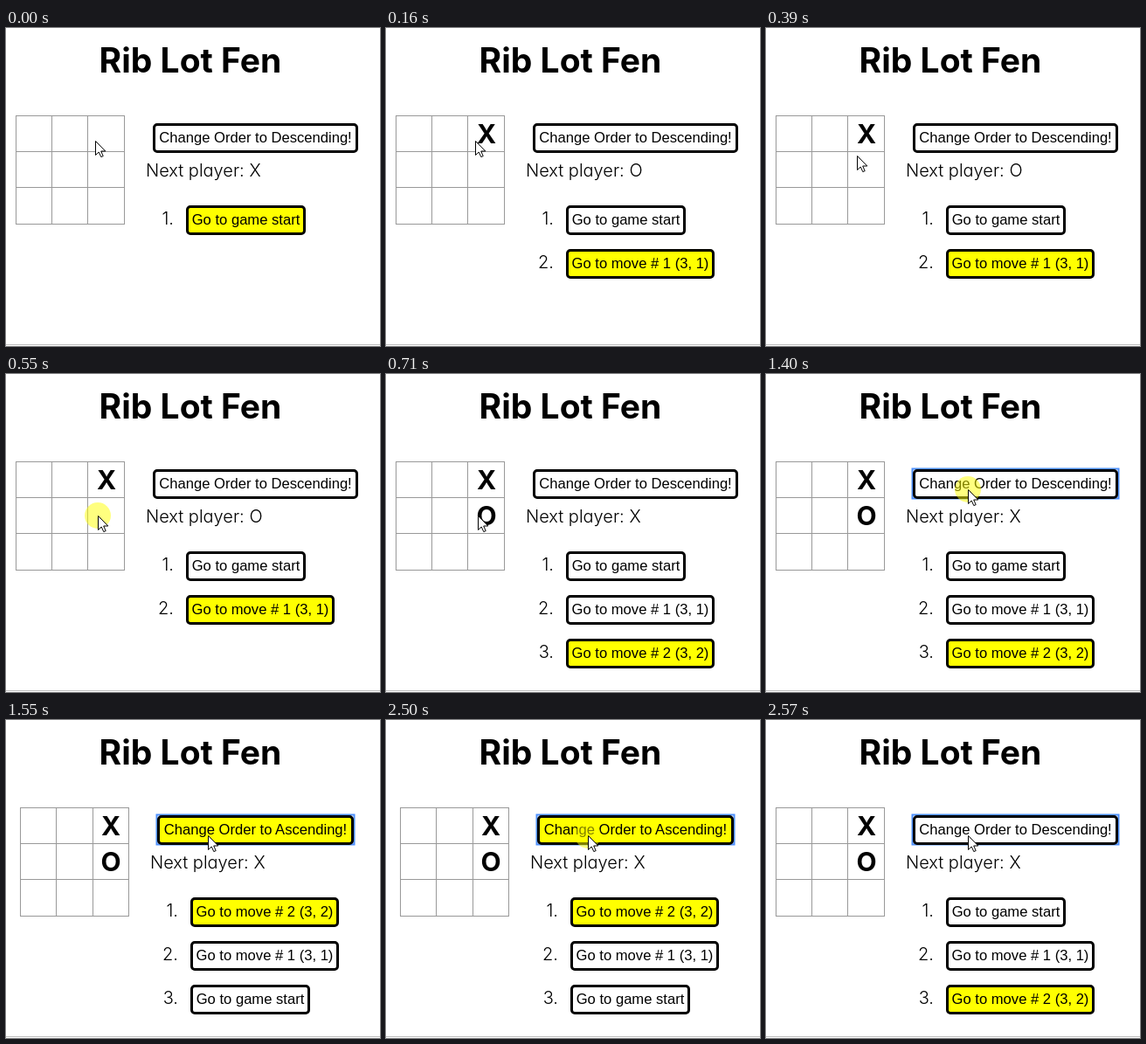
Recreate the animation shown at these times as an HTML page. Size 428 px wide and 364 px high, loop 2.73 s.

```html
<!DOCTYPE html>
<html lang="en">
<head>
<meta charset="utf-8">
<title>Three in a row</title>
<style>
  html, body { margin: 0; width: 100%; height: 100%; overflow: hidden; background: #fff; }
  svg { display: block; width: 428px; height: 364px; }
  text { font: 300 20px Inter, sans-serif; font-feature-settings: "cv11"; fill: #000; }
  .title { font-size: 39px; font-weight: 700; text-anchor: middle; }
  .mark { font-size: 30px; font-weight: 700; text-anchor: middle; }
  .num { text-anchor: end; }
  .label { font: 16.6px Arial, "Liberation Sans", sans-serif; text-anchor: middle; }
</style>
</head>
<body>
<svg viewBox="0 0 428 364">
  <text class="title" x="211" y="51">Rib Lot Fen</text>
  <rect y="362" width="428" height="1" fill="#bdbdbd"/>
  <g id="game"></g>
  <circle id="spot" r="15" fill="#ff0" fill-opacity=".5"/>
  <path id="pointer" d="M.5.5V16.5L4.2 13 6.8 18.6 9.2 17.6 6.7 12H11.8Z" fill="#fff" stroke="#000"/>
</svg>
<script>
const LOOP = 2730;
const YELLOW = '#ff0';
const game = document.getElementById('game');
const spot = document.getElementById('spot');
const pointer = document.getElementById('pointer');

// The picture only changes at these times.
const ticks = [0, 80, 160, 240, 320, 400, 480, 550, 710, 790, 870, 950,
  1020, 1090, 1170, 1240, 1320, 1400, 1550, 2500, 2570];

// Pointer glides: start, end, from, to.
const glides = [
  [160, 480, [102, 129], [105, 162]],
  [710, 1090, [105, 162], [231, 140]],
  [1090, 1320, [231, 140], [231, 132]]
];

// Mouse presses: down, up.
const presses = [[80, 160], [550, 710], [1400, 1550], [2500, 2570]];

const ease = p => p * p * (3 - 2 * p);

function pointerAt(t) {
  let pos = glides[0][2];
  for (const [start, end, from, to] of glides) {
    if (t < start) break;
    const p = ease(Math.min(1, (t - start) / (end - start)));
    pos = from.map((v, i) => Math.round(v + (to[i] - v) * p));
  }
  return pos;
}

const text = (cls, x, y, str) => `<text class="${cls}" x="${x}" y="${y}">${str}</text>`;
const rect = (x, y, w, h, attrs) =>
  `<rect x="${x}" y="${y}" width="${w}" height="${h}" ${attrs}/>`;

function button(x, y, w, label, on) {
  return rect(x + 1.5, y + 1.5, w - 3, 31,
    `rx="3.5" fill="${on ? YELLOW : '#fff'}" stroke="#000" stroke-width="3"`) +
    text('label', x + w / 2, y + 22, label);
}

function board(left, moves) {
  let out = '';
  for (let i = 0; i < 4; i++) {
    const x = Math.floor(left + i * 41.34);
    const y = Math.floor(100 + i * 41.34);
    out += rect(x, 100, 1, 125, 'fill="#999"');
    out += rect(Math.floor(left), y, 125, 1, 'fill="#999"');
  }
  const cx = Math.floor(left) + 104;
  if (moves > 0) out += text('mark', cx, 132, 'X');
  if (moves > 1) out += text('mark', cx, 173, 'O');
  return out;
}

function scene(moves, descending, focused) {
  const dx = descending ? 5 : 0;
  const w = descending ? 225 : 235;
  let out = board(descending ? 16.4 : 11.2, moves);
  if (focused) out += rect(167.5 + dx, 108.5, w + 1, 34, 'fill="none" stroke="#4d90fe" stroke-width="2"');
  out += button(168 + dx, 109, w,
    `Change Order to ${descending ? 'Ascending' : 'Descending'}!`, descending);
  out += text('', 160 + dx, 170, `Next player: ${moves % 2 ? 'O' : 'X'}`);
  for (let row = 0; row <= moves; row++) {
    const move = descending ? moves - row : row;
    const y = 203 + row * 50;
    const label = move ? `Go to move # ${move} (3, ${move})` : 'Go to game start';
    out += text('num', 192 + dx, y + 22, `${row + 1}.`);
    out += button(206 + dx, y, move ? 170 : 137, label, move === moves);
  }
  return out;
}

let shown = -1;

function draw(time) {
  const t = ticks.filter(v => v <= time).pop();
  if (t === shown) return;
  shown = t;
  const moves = (t >= 160) + (t >= 710);
  game.innerHTML = scene(moves, t >= 1550 && t < 2570, t >= 1400);
  const place = `translate(${pointerAt(t)})`;
  pointer.setAttribute('transform', place);
  spot.setAttribute('transform', place);
  const pressed = presses.some(([down, up]) => t >= down && t < up);
  spot.setAttribute('visibility', pressed ? 'visible' : 'hidden');
}

const began = performance.now();
function loop() {
  draw((performance.now() - began) % LOOP);
  requestAnimationFrame(loop);
}
loop();
</script>
</body>
</html>
```
